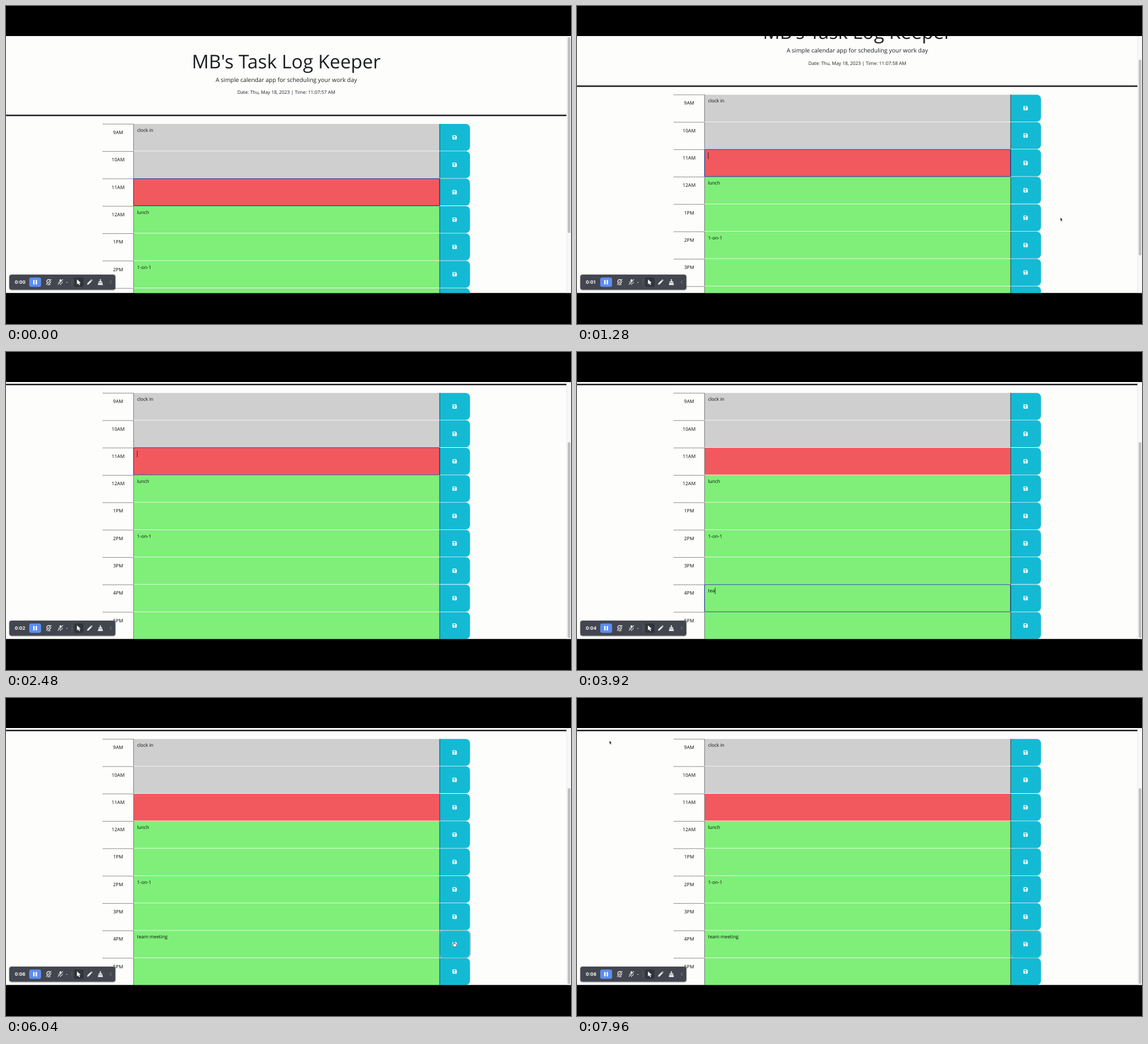
An HTML page for the animation above (8000 ms loop, 998 by 561 pixels).

```html
<!DOCTYPE html>
<html lang="en">
<head>
<meta charset="utf-8">
<title>Day schedule</title>
<style>
  html, body { margin: 0; width: 100%; height: 100%; overflow: hidden; background: #000; }
  svg { display: block; width: 100vw; height: 100vh; }
  text {
    font-family: "Open Sans", "Noto Sans", sans-serif; font-size: 8.3px; fill: #0c0c0c;
    white-space: pre; text-rendering: geometricPrecision;
  }
  .mid { text-anchor: middle; }
  .hour { font-size: 8.5px; }
  .head { fill: #1c1f22; }
  .clock { font: 700 8px Inter, "Open Sans", sans-serif; fill: #fff; }
</style>
</head>
<body>
<svg id="stage" viewBox="0 0 998 561"></svg>
<script>
const LOOP = 8000, TOP = 208, PITCH = 48.3, MAX_SCROLL = 135.7;
const GRAY = '#cfcfd0', RED = '#f2595f', GREEN = '#7fef79', CYAN = '#14bad4';
const HOURS = ['9AM', '10AM', '11AM', '12AM', '1PM', '2PM', '3PM', '4PM', '5PM'];
const NOTES = { 0: 'clock in', 3: 'lunch', 5: '1-on-1' };
const NOW = 2, EDITED = 7, TYPED = 'team meeting';

// [ms, value...] key points
const SCROLL = [[400, 0], [640, 5], [880, 20.8], [1200, 46], [1680, 79], [1900, 112], [2120, 130], [2280, MAX_SCROLL]];
const MOUSE = [[2200, 854, 373], [2480, 753, 411], [2800, 751, 424], [5100, 751, 424], [5600, 792, 434],
  [6350, 792, 434], [6880, 396, 291], [7300, 190, 188], [7560, 104, 130], [7840, 57.5, 75]];
const FOCUS_AT = 2920, TYPE_FROM = 3640, TYPE_TO = 4840, SAVE_AT = 5960;

const rowY = i => TOP + i * PITCH;
const rect = (x, y, w, h, fill, more = '') =>
  `<rect x="${x}" y="${y}" width="${w}" height="${h}" fill="${fill}" ${more}/>`;
const path = (d, fill, more = '') => `<path d="${d}" fill="${fill}" ${more}/>`;
const line = (d, color, width, more = '') =>
  path(d, 'none', `stroke="${color}" stroke-width="${width}" ${more}`);
const text = (x, y, s, more = '') => `<text x="${x}" y="${y}" ${more}>${s}</text>`;

function disk(x, y) {
  return `<g transform="translate(${x} ${y})">` +
    path('M-3.8 -2.8a1 1 0 0 1 1 -1H2L3.8 -2V2.8a1 1 0 0 1 -1 1H-2.8a1 1 0 0 1 -1 -1Z', '#fff') +
    rect(-2.5, -2.6, 4.1, 1.9, CYAN) +
    `<circle cy="1.4" r="1.15" fill="${CYAN}"/></g>`;
}

function row(hour, i) {
  const y = rowY(i), h = PITCH - .8, r = 7.5;
  const fill = i < NOW ? GRAY : i > NOW ? GREEN : RED;
  return line(`M171 ${y + .3}H225`, '#333', .9, 'stroke-dasharray="1.6 1"') +
    text(198, y + 18, hour, 'class="mid hour"') +
    rect(225.4, y, 540.4, h, fill) +
    line(`M225.3 ${y}v${h}`, '#555', .8) +
    path(`M766 ${y}h${53.6 - r}a${r} ${r} 0 0 1 ${r} ${r}v${h - 2 * r}a${r} ${r} 0 0 1 ${-r} ${r}H766Z`, CYAN) +
    line(`M766 ${y}v${h}`, '#1d2a30', .9) +
    disk(792.4, y + 23.8) +
    text(231.5, y + 14, NOTES[i] || '', `id="note${i}"`);
}

function toolbar() {
  const white = '#e9eaed';
  return rect(4.8, 473.2, 189.4, 28.8, '#000', 'rx="5" opacity=".25"') +
    rect(6, 474, 187, 26.5, '#43464f', 'rx="4"') +
    text(15.5, 490, '0:00', 'id="timer" class="clock"') +
    rect(41, 479, 21, 16.5, '#5c8df3', 'rx="3.5"') +
    rect(48, 483.2, 2.4, 8, '#fff', 'rx=".6"') + rect(52.4, 483.2, 2.4, 8, '#fff', 'rx=".6"') +
    // camera off
    `<circle cx="75.5" cy="486" r="3.4" fill="none" stroke="${white}" stroke-width="1.5"/>` +
    line('M72.5 491.6h6', white, 1.3) +
    line('M71.2 492L80.4 482.2', '#43464f', 2.4) + line('M70.8 491.6L80 482', white, 1.1) +
    // microphone off
    rect(94.6, 482, 3.2, 6, white, 'rx="1.6"') +
    line('M92.6 486.4a3.6 3.6 0 0 0 7.2 0M96.2 490v2.2', white, 1) +
    line('M92 492L101 482.6', '#43464f', 2.2) + line('M91.6 491.6L100.6 482.2', white, 1.1) +
    path('M106.4 487h2.6l-1.3 1.5Z', white) +
    line('M116.5 481.5v11.5', '#5e616a', .8) +
    rect(120.5, 479, 16.5, 16.5, '#31343b', 'rx="3"') +
    path('M125.4 482.2v9l2.2 -2 1.6 3.2 1.5 -.8 -1.6 -3.1h3Z', '#fff') +
    // pencil
    path('M143.2 491.8l.6 -2.7 5.6 -5.6 2.1 2.1 -5.6 5.6ZM150 482.9l.9 -.8 2.1 2.1 -.9 .8Z', white) +
    // brush
    path('M165.8 482h1.8v3.8h2.4v2h-6.6v-2h2.4ZM163 488.6h7.4l.8 3.6h-9Z', white) +
    line('M186.2 484.4l-2.4 2.8 2.4 2.8', '#8d9098', 1);
}

document.getElementById('stage').innerHTML =
  rect(0, 53, 998, 453.5, '#fdfdfc') +
  '<g id="page">' +
    text(495, 110, "MB's Task Log Keeper", 'class="mid head" style="font-size:33.3px"') +
    text(495, 133.5, 'A simple calendar app for scheduling your work day', 'class="mid head" style="font-size:10.37px"') +
    text(495, 155.4, '', 'id="date" class="mid head"') +
    rect(0, 191.7, 990, 2.6, '#1e2023') +
    HOURS.map(row).join('') +
    rect(225.4, 0, 540.4, PITCH - .4, 'none', 'id="ring" stroke="#1c3f94" stroke-width="1.1" rx="1"') +
    rect(765.2, rowY(EDITED) - .5, 55.2, PITCH + .2, 'none', 'id="glow" stroke="#8fb3bd" stroke-width="1.5" rx="7" opacity=".7"') +
    rect(0, 0, .8, 11.6, '#111', 'id="caret"') +
  '</g>' +
  rect(990, 53, 8, 453.5, '#f8f8f8') + line('M990.3 53v453.5', '#e6e6e6', .7) +
  rect(992.2, 55, 4.6, 345.5, '#bfbfc2', 'id="thumb" rx="2.3"') +
  toolbar() +
  '<g id="mouse">' +
    path('M0 0V6.2L1.3 5 2.1 7.2 3.1 6.8 2.2 4.6H3.7Z', '#111', 'id="arrow" stroke="#fff" stroke-width=".3"') +
    line('M-1.4 -4h2.8M0 -4v8M-1.4 4h2.8', '#b9c6b6', .9, 'id="beam"') +
    path('M-1.5 -3.5q.8 -.8 1.5 0V-.6l3 .8q.9 .4 .7 1.6L3 5H-1L-3.4 1.6q.2 -1 1.9 0Z', '#fff', 'id="hand" stroke="#222" stroke-width=".6"') +
  '</g>' +
  rect(0, 0, 998, 53, '#000') + rect(0, 506.5, 998, 54.5, '#000');

const el = {};
document.querySelectorAll('[id]').forEach(e => el[e.id] = e);
const show = (e, on) => e.setAttribute('visibility', on ? 'visible' : 'hidden');
const move = (e, x, y) => e.setAttribute('transform', `translate(${x} ${y})`);
const smooth = p => p * p * (3 - 2 * p);

function sample(keys, t, ease = p => p) {
  if (t <= keys[0][0]) return keys[0].slice(1);
  for (let i = 1; i < keys.length; i++) {
    const [a, b] = [keys[i - 1], keys[i]];
    if (t < b[0]) {
      const p = ease((t - a[0]) / (b[0] - a[0]));
      return a.slice(1).map((v, k) => v + (b[k + 1] - v) * p);
    }
  }
  return keys[keys.length - 1].slice(1);
}

function update(t) {
  const [scroll] = sample(SCROLL, t);
  move(el.page, 0, -scroll);
  el.thumb.setAttribute('y', 55 + scroll * .766);
  el.date.textContent = `Date: Thu, May 18, 2023 | Time: 11:07:${Math.min(59, 57 + Math.floor((t + 240) / 1000))} AM`;
  el.timer.textContent = `0:0${Math.floor((t + 80) / 1000)}`;

  const typing = (t - TYPE_FROM) / (TYPE_TO - TYPE_FROM);
  const count = Math.max(0, Math.min(TYPED.length, Math.ceil(typing * TYPED.length)));
  const note = el['note' + EDITED];
  note.textContent = TYPED.slice(0, count);

  const focus = t < FOCUS_AT ? NOW : EDITED;
  const saved = t >= SAVE_AT;
  el.ring.setAttribute('y', rowY(focus) - .1);
  show(el.ring, !saved);
  show(el.glow, saved);
  let blink = (t + 900) % 1000 < 500;
  if (t >= FOCUS_AT) blink = (t >= TYPE_FROM && t < TYPE_TO + 500) || (t - FOCUS_AT) % 1000 < 500;
  el.caret.setAttribute('x', 231.5 + (count ? note.getComputedTextLength() : 0));
  el.caret.setAttribute('y', rowY(focus) + 5.2);
  show(el.caret, blink && !saved);

  const [x, y] = sample(MOUSE, t, smooth);
  const visible = t >= 560 && !(t >= TYPE_FROM && t < 5100);
  const overText = x > 225 && x < 766;
  const overButton = x >= 766 && x < 820;
  move(el.mouse, x, y);
  show(el.arrow, visible && !overText && !overButton);
  show(el.beam, visible && overText);
  show(el.hand, visible && overButton);
}

const start = performance.now();
function tick() {
  update((performance.now() - start) % LOOP);
  requestAnimationFrame(tick);
}
tick();
</script>
</body>
</html>
```
